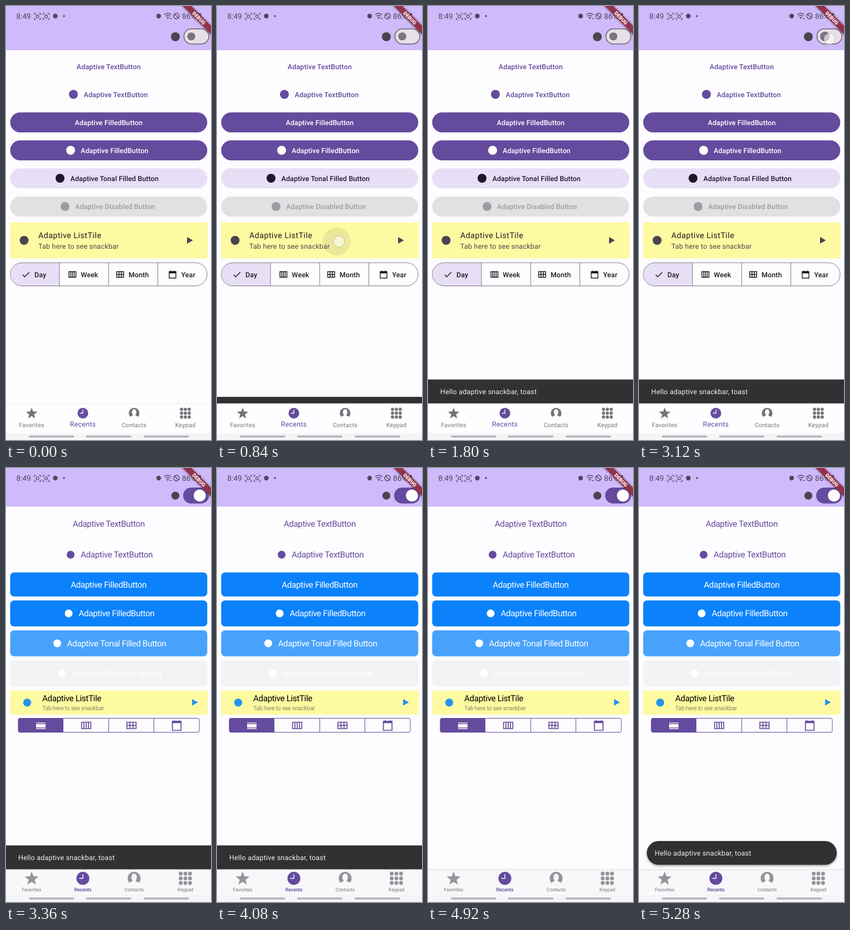
Recreate the animation shown at these times as an HTML page. Size 368 by 776 pixels, loop 5400 ms.

```html
<!DOCTYPE html>
<html lang="en">
<head>
<meta charset="utf-8">
<title>Adaptive widgets</title>
<style>
html, body { margin: 0; width: 100%; height: 100%; overflow: hidden; background: #fdfcfe; }
svg { display: block; width: 368px; height: 776px; font-family: Roboto, sans-serif; text-rendering: geometricPrecision; }
#toast { filter: drop-shadow(0 2px 2px rgba(0,0,0,.35)); }
#banner rect { filter: drop-shadow(0 0 2px rgba(0,0,0,.5)); }
</style>
</head>
<body>
<svg id="stage" viewBox="0 0 368 776"></svg>
<script>
const PURPLE = '#644b9d', INK = '#1d1b20', SOFT = '#49454f', GRAY = '#79747e', LILAC = '#e6dff5';
const HEADER = '#cfbafb', YELLOW = '#fefaa1', BLUE = '#0b82fb', SKY = '#2495ee', DARK = '#313033';
const LOOP = 5400, STEP = 120, SWAP = 3240;

// Markup helpers
const text = (x, y, str, size, fill, spacing = 0, weight = 400, anchor = 'start') =>
  `<text x="${x}" y="${y}" font-size="${size}" fill="${fill}" letter-spacing="${spacing}" font-weight="${weight}" text-anchor="${anchor}">${str}</text>`;
const rect = (x, y, w, h, r, fill, more = '') =>
  `<rect x="${x}" y="${y}" width="${w}" height="${h}" rx="${r}" fill="${fill}" ${more}/>`;
const dot = (x, y, r, fill, more = '') => `<circle cx="${x}" cy="${y}" r="${r}" fill="${fill}" ${more}/>`;
const path = (d, fill, more = '') => `<path d="${d}" fill="${fill}" ${more}/>`;
const line = (d, color, width) => path(d, 'none', `stroke="${color}" stroke-width="${width}"`);
const play = (x, y, fill) => path(`M${x} ${y - 6}l10.5 6l-10.5 6z`, fill);

function gridIcon(x, y, w, h, cols, rows, color, width) {
  let d = `M${x} ${y}h${w}v${h}h${-w}z`;
  for (let i = 1; i < cols; i++) d += `M${x + w * i / cols} ${y}v${h}`;
  for (let i = 1; i < rows; i++) d += `M${x} ${y + h * i / rows}h${w}`;
  return line(d, color, width);
}

const calendarIcon = (x, y, w, h, color, width) =>
  line(`M${x} ${y + 2}h${w}v${h - 2}h${-w}zM${x + 3} ${y}v3M${x + w - 3} ${y}v3`, color, width) +
  rect(x, y + 1.5, w, 3.6, 0, color);

function starPath(cx, cy, r) {
  const pts = [];
  for (let i = 0; i < 10; i++) {
    const a = i * Math.PI / 5 - Math.PI / 2, k = i % 2 ? r * .42 : r;
    pts.push((cx + k * Math.cos(a)).toFixed(2) + ' ' + (cy + k * Math.sin(a)).toFixed(2));
  }
  return 'M' + pts.join('L') + 'z';
}

function navBar(top, fill, edge, cy, r, gray, label) {
  let s = rect(0, top, 368, 764 - top, 0, fill) + rect(0, top - .5, 368, 1, 0, edge);
  s += path(starPath(46, cy + .8, r * 1.13), gray);
  s += dot(138, cy, r, PURPLE) + line(`M138 ${cy - r * .65}V${cy}H${138 - r * .55}`, '#fff', 1.4);
  s += dot(230, cy, r, gray);
  s += `<g transform="translate(230 ${cy}) scale(${r})">` +
    path('M-.42-.22a.42.5 0 1 1 .84 0c0 .3-.12.45-.2.55c0 .18.4.2.52.38A.9.9 0 0 1-.74.71c.12-.18.52-.2.52-.38c-.08-.1-.2-.25-.2-.55z', fill) + '</g>';
  for (let i = 0; i < 9; i++)
    s += dot(322 + (i % 3 - 1) * r * .72, cy + (Math.floor(i / 3) - 1) * r * .72, r * .3, gray);
  return s + ['Favorites', 'Recents', 'Contacts', 'Keypad'].map((name, i) => label(46 + 92 * i, name, i === 1)).join('');
}

const materialLabel = (x, y, str, fill, anchor) => text(x, y, str, 12.5, fill, .09, 500, anchor);
const cupertinoLabel = (x, y, str, fill, anchor) => text(x, y, str, 15.2, fill, -.367, 400, anchor);
const pageHeader = h => rect(0, 0, 368, h, 0, HEADER);

function materialPage() {
  const row = (y, fill, icon, x, str, color) =>
    rect(7.5, y - 17.8, 353.8, 35.8, 17.9, fill) +
    (icon ? dot(icon, y, 8, color) : '') + materialLabel(x, y + 4.5, str, color, icon ? 'start' : 'middle');
  return pageHeader(79) + dot(304, 55, 8, SOFT) +
    row(108, 'none', 0, 184.4, 'Adaptive TextButton', PURPLE) +
    row(158, 'none', 121, 139.5, 'Adaptive TextButton', PURPLE) +
    row(208, PURPLE, 0, 184.4, 'Adaptive FilledButton', '#fff') +
    row(258, PURPLE, 116, 134, 'Adaptive FilledButton', '#fff') +
    row(308, LILAC, 97, 115.5, 'Adaptive Tonal Filled Button', '#1d192b') +
    row(358.5, '#e1e0e3', 106, 124, 'Adaptive Disabled Button', '#9d9ca0') +
    rect(7.5, 387, 354.3, 64.3, 0, YELLOW) +
    '<g clip-path="url(#tileClip)"><circle id="ripple" fill="#49454f"/></g>' +
    dot(32.5, 419, 8, SOFT) +
    text(58, 414.5, 'Adaptive ListTile', 14.3, INK, .45) +
    text(58, 434, 'Tab here to see snackbar', 12.5, SOFT, .22) + play(325, 419, SOFT) +
    path('M96 459H28.5a20.8 20.8 0 0 0 0 41.5H96z', LILAC) +
    rect(7.8, 459, 353.2, 41.5, 20.8, 'none', `stroke="${GRAY}" stroke-width=".95"`) +
    line('M96 459v41.5M184.3 459v41.5M272.6 459v41.5', GRAY, .95) +
    line('M30 480.5l3.6 3.7l8.2-8.2', INK, 1.5) +
    gridIcon(113, 475, 12.5, 10, 4, 1, INK, 1.4) +
    gridIcon(198.7, 475, 12.5, 10, 3, 2, INK, 1.4) +
    calendarIcon(293, 473, 12, 13.5, INK, 1.4) +
    [['Day', 51], ['Week', 134.3], ['Month', 220], ['Year', 314.5]].map(([s, x]) => materialLabel(x, 484.5, s, INK)).join('') +
    rect(319.4, 40.8, 44.8, 27, 13.5, '#e6e0e9', `stroke="${GRAY}" stroke-width="1.8"`) +
    `<circle id="thumb" cy="54.4" fill="${GRAY}"/>`;
}

function cupertinoPage() {
  const row = (y, h, fill, icon, x, str, color, id = '') => `<g ${id}>` +
    rect(7.5, y - h / 2, 353.8, h, 7, fill) + '</g>' +
    (icon ? dot(icon, y, 7, color) : '') + cupertinoLabel(x, y + 5.4, str, color, icon ? 'start' : 'middle');
  return pageHeader(69) + dot(304, 49.5, 7.2, SOFT) +
    row(99.3, 43, 'none', 0, 184.3, 'Adaptive TextButton', PURPLE) +
    row(155, 46, 'none', 116, 134, 'Adaptive TextButton', PURPLE) +
    row(208.3, 43, BLUE, 0, 184.3, 'Adaptive FilledButton', '#fff') +
    row(260, 46.5, BLUE, 112.5, 130.5, 'Adaptive FilledButton', '#fff') +
    row(313.5, 46.5, '#48a2fb', 92, 109.5, 'Adaptive Tonal Filled Button', '#fff', 'id="tonal"') +
    row(367.3, 46.5, '#f3f2f5', 100, 118, 'Adaptive Disabled Button', '#fff') +
    rect(7.5, 398, 354.3, 43, 0, YELLOW) + dot(38, 419.5, 7.2, SKY) +
    cupertinoLabel(65, 417, 'Adaptive ListTile', '#000') +
    text(65, 433, 'Tab here to see snackbar', 10.74, '#8b8866', -.367) + play(334, 419, SKY) +
    rect(22, 447.5, 325, 25, 3, 'none', `stroke="${PURPLE}"`) +
    path('M103 447.5H25a3 3 0 0 0-3 3v19a3 3 0 0 0 3 3h78z', PURPLE) +
    line('M184.5 447.5v25M265.5 447.5v25', PURPLE, 1) +
    line('M54 455.8h17M54 466h17', '#fff', 1.3) + rect(54, 458, 17, 6, 0, '#fff') +
    gridIcon(135.7, 454.5, 16.5, 11.5, 4, 1, PURPLE, 1.7) +
    gridIcon(217, 454.5, 16.5, 11.5, 3, 2, PURPLE, 1.7) +
    calendarIcon(298.7, 451, 15.5, 18, PURPLE, 1.7) +
    rect(318, 35, 46.5, 28.5, 14.2, PURPLE) + '<circle id="knob" cy="49.2" r="10.8" fill="#fff"/>';
}

function statusBar() {
  const C = '#4d4760';
  const capture = x => line(`M${x} 16v-3h3m5 0h3v3m0 5v3h-3m-5 0h-3v-3`, C, 1.1) +
    rect(x + 3.2, 16.2, 4.6, 4.6, 1, 'none', `stroke="${C}" stroke-width="1.2"`);
  return text(18.5, 22.5, '8:49', 13.6, C) + capture(51) + capture(66.5) + dot(88.5, 18, 4.2, C) + dot(104, 18, 1.7, C) +
    dot(274, 18, 4.2, C) +
    line('M284 15.5q6.5-5 13 0M286.3 18.3q4.2-3.2 8.4 0M288.5 21q2-1.4 4 0', C, 1.4) + path('M289 21.5h3l-1.5 2z', C) +
    line('M294 22.5h4', C, 1.2) +
    dot(306, 18, 5, 'none', `stroke="${C}" stroke-width="1.4"`) + line('M302.5 14.5l7 7', C, 1.4) +
    text(316, 22.5, '86%', 13.6, C) + rect(344, 13, 6, 10, 1, C);
}

const snackText = (x, y) => text(x, y, 'Hello adaptive snackbar, toast', 12.5, '#f4eff4', .22);

document.getElementById('stage').innerHTML =
  '<clipPath id="tileClip"><rect x="7.5" y="387" width="354.3" height="64.3"/></clipPath>' +
  rect(0, 0, 368, 776, 0, '#fdfcfe') +
  `<g id="material">${materialPage()}</g><g id="cupertino">${cupertinoPage()}</g>` +
  `<g id="snack">${rect(0, 0, 368, 43.2, 0, DARK) + snackText(22, 26.4)}</g>` +
  `<g id="toast">${rect(14, 667, 341, 42.5, 21.2, DARK) + snackText(28.3, 692.6)}</g>` +
  `<g id="materialNav">${navBar(711, '#fefdff', '#ededf0', 728, 9.6, '#757378', (x, s, on) =>
    on ? text(x, 752.3, s, 12.5, PURPLE, .22, 400, 'middle') : text(x, 753, s, 10.74, '#757378', .2, 400, 'middle'))}</g>` +
  `<g id="cupertinoNav">${navBar(718, '#f8f7fa', '#dcdbdf', 733.7, 11.6, '#959499', (x, s, on) =>
    text(x, 756.5, s, 8.95, on ? PURPLE : '#959499', -.21, 500, 'middle'))}</g>` +
  rect(0, 763.5, 368, 12.5, 0, '#f5f4f7') +
  [41, 143.5, 247].map(x => rect(x, 768, 81.5, 3.6, 1.8, '#b4b3b8')).join('') +
  statusBar() +
  `<g id="banner" transform="translate(368 0) rotate(45)">${rect(-60, 25.1, 120, 10.7, 0, '#92324a') +
    text(0, 33.8, 'DEBUG', 9.1, '#fff', 0, 900, 'middle')}</g>` +
  '<circle id="touch" r="10" fill="#fff" fill-opacity=".6" stroke="#8a8a90" stroke-opacity=".45"/>';

// Motion helpers
const progress = (t, from, to) => Math.min(1, Math.max(0, (t - from) / (to - from)));
const pulse = (t, inAt, outAt, fade) => progress(t, inAt, inAt + fade) * (1 - progress(t, outAt, outAt + fade));

// Cubic bezier (.4, 0, .2, 1)
function ease(x) {
  let lo = 0, hi = 1;
  for (let i = 0; i < 20; i++) {
    const s = (lo + hi) / 2, q = 1 - s;
    if (1.2 * q * q * s + .6 * q * s * s + s * s * s < x) lo = s; else hi = s;
  }
  return 3 * (1 - lo) * lo * lo + lo * lo * lo;
}

const set = (id, attrs) => {
  const el = document.getElementById(id);
  for (const key in attrs) el.setAttribute(key, attrs[key]);
};
const show = (id, on) => set(id, { display: on ? 'inline' : 'none' });

const TAPS = [[219, 421, 650, 860], [342, 59, 3000, 3180], [254, 315, 4500, 4690]];

function draw(t) {
  const ios = t >= SWAP;
  show('material', !ios);
  show('materialNav', !ios);
  show('cupertino', ios);
  show('cupertinoNav', ios);

  const spread = progress(t, 840, 1320);
  set('ripple', {
    cx: 215 - 31 * spread, cy: 421 - 2 * spread,
    r: 25 * progress(t, 600, 840) + 175 * spread,
    opacity: .1 * (1 - progress(t, 1000, 1560))
  });

  const press = progress(t, 3060, 3180);
  set('thumb', { cx: 332.6 + 2 * press, r: 7.2 + 3 * press });
  set('knob', { cx: 332 + 18 * ease(progress(t, SWAP, SWAP + 200)) });
  set('tonal', { opacity: 1 - .58 * pulse(t, 4520, 4700, 150) });

  const rise = ease(progress(t, 773, 1023) - progress(t, 4632, 4882));
  show('snack', rise > 0);
  set('snack', { transform: `translate(0 ${(ios ? 718 : 711) - 43.2 * rise})` });
  const pop = progress(t, 4882, 5132);
  show('toast', pop > 0);
  set('toast', { opacity: progress(pop, .3, 1), transform: `translate(0 ${51 * (1 - ease(pop))})` });

  const tap = TAPS.find(([, , from, to]) => t >= from && t < to + 150);
  show('touch', tap);
  if (tap) set('touch', { cx: tap[0], cy: tap[1], opacity: pulse(t, tap[2] - 100, tap[3], 150) });
}

function tick() {
  draw(Math.floor(performance.now() % LOOP / STEP) * STEP);
  requestAnimationFrame(tick);
}
tick();
</script>
</body>
</html>
```
